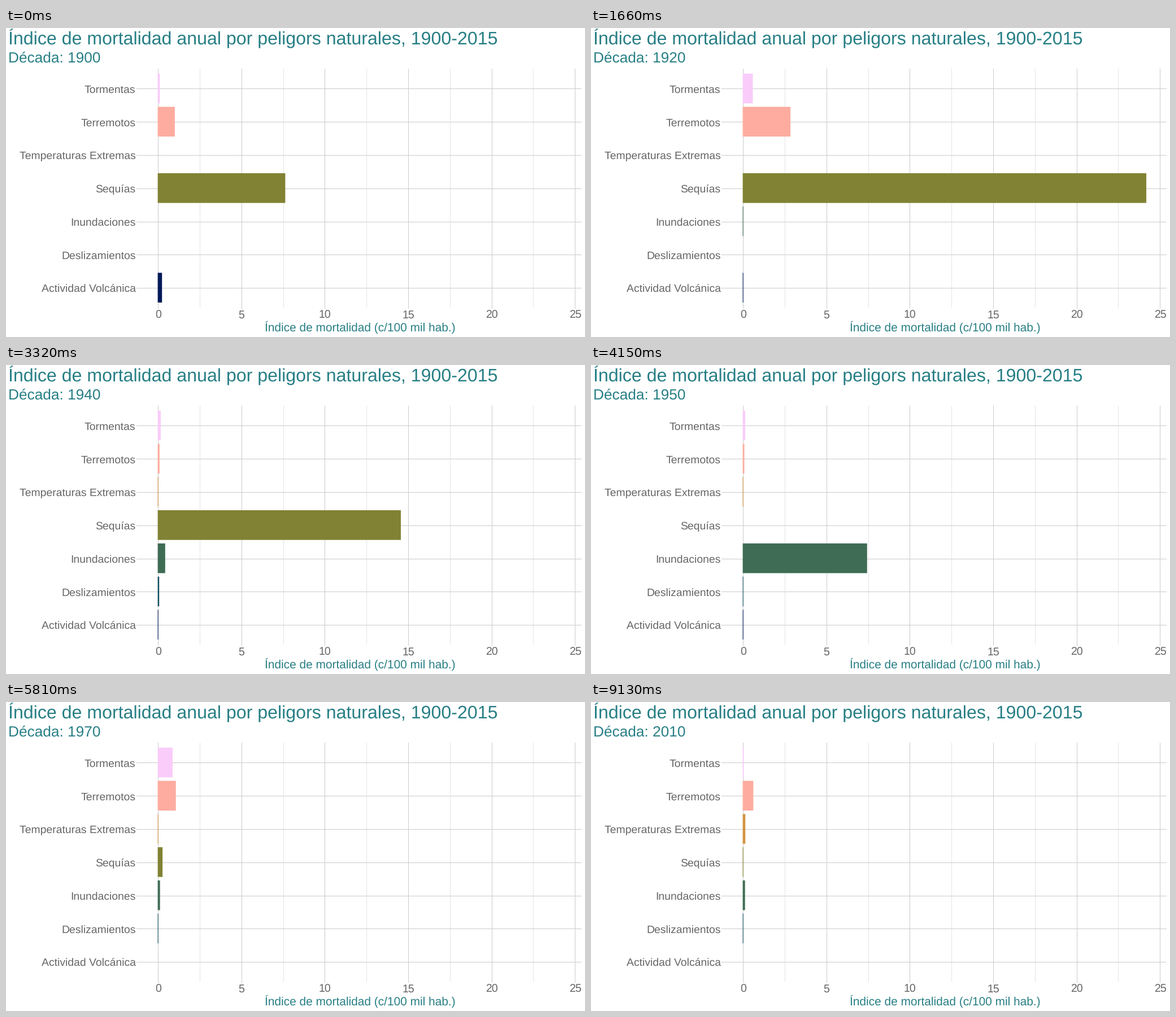
A matplotlib script that plays this animation: 1025 px wide and 547 px high, repeating every 9.96 s.

```python
import math

import matplotlib.pyplot as plt
from matplotlib.animation import FuncAnimation
from matplotlib.patches import Rectangle

W, H, DPI = 1025, 547, 64
PT = 72 / DPI                       # points per pixel
X0, UNIT = 269.1, 29.525            # zero line and pixels per unit
ROW0, PITCH = 107.49, 58.76         # first row centre and row spacing
BAR_LEFT, BAR_H = 268.6, 52.6
TOP, BOTTOM, LEFT, RIGHT = 72, 495, 231, 1019
TEAL, GREY = "#277f85", "#666666"
DECADES = range(1900, 2020, 10)


class Hazard:
    """Death rate as a steady level over some years plus bell-shaped peaks."""

    def __init__(self, name, color, level, since, until, spread, **peaks):
        self.name, self.color = name, color
        self.level, self.since, self.until = level, since, until
        self.spread = spread
        self.peaks = [(int(year[1:]), top) for year, top in peaks.items()]

    def rate(self, decade):
        steady = self.level if self.since <= decade <= self.until else 0
        bells = sum(top * math.exp(-((decade - year) / self.spread) ** 2 / 2)
                    for year, top in self.peaks)
        return max(steady, bells)


HAZARDS = [
    Hazard("Tormentas", "#f9ccf9", 0.05, 1900, 2010, 11.5,
           y1921=0.59, y1974=0.93),
    Hazard("Terremotos", "#fdac9f", 0.08, 1900, 2010, 8,
           y1900=0.84, y1919=2.83, y1970=1.07, y2005=0.75),
    Hazard("Temperaturas Extremas", "#d29343", 0.02, 1930, 2010, 5,
           y2005=0.23),
    Hazard("Sequías", "#818233", 0.02, 1990, 2010, 2,
           y1900=7.63, y1920=24.18, y1940=14.56, y1960=4.54,
           y1970=0.27, y1980=1.15),
    Hazard("Inundaciones", "#3e6c54", 0.12, 1960, 2010, 2,
           y1910=0.57, y1920=0.02, y1930=19.84, y1940=0.43, y1950=7.44),
    Hazard("Deslizamientos", "#134e60", 0.02, 1950, 2010, 2, y1940=0.07),
    Hazard("Actividad Volcánica", "#001959", 0.02, 1910, 1960, 2,
           y1900=0.24, y1980=0.05),
]

plt.rcParams["font.family"] = "Liberation Sans"
plt.rcParams["text.hinting"] = "none"

fig = plt.figure(figsize=(W / DPI, H / DPI), dpi=DPI, facecolor="white")
ax = fig.add_axes([0, 0, 1, 1])
ax.set_xlim(0, W)
ax.set_ylim(H, 0)
ax.axis("off")


def label(x, y, text, size, color, ha="left"):
    return ax.text(x, y, text, fontsize=size * PT, color=color,
                   ha=ha, va="baseline")


def rule(xs, ys, color="#cbcbcb"):
    ax.plot(xs, ys, color=color, lw=PT, snap=False,
            solid_capstyle="butt", zorder=1)


def vertical(value, bottom, **style):
    x = round(X0 + value * UNIT) + 0.5
    rule((x, x), (TOP, bottom), **style)


for k in range(5):
    vertical(2.5 + 5 * k, BOTTOM, color="#e4e4e4")
for tick in range(0, 26, 5):
    vertical(tick, BOTTOM + 2)
    label(X0 + tick * UNIT + 0.3, 514, str(tick), 19.5, GREY, "center")

bars = []
for i, hazard in enumerate(HAZARDS):
    y = ROW0 + i * PITCH
    line_y = round(y) + 0.5
    rule((LEFT, RIGHT), (line_y, line_y))
    label(229.5, y + 7.3, hazard.name, 19.4, GREY, "right")
    bar = Rectangle((BAR_LEFT, y - 0.4 - BAR_H / 2), 0, BAR_H,
                    facecolor=hazard.color, lw=0, snap=False, zorder=2)
    bars.append(ax.add_patch(bar))

label(3.5, 29.4, "Índice de mortalidad anual por peligors naturales, 1900-2015",
      32.18, TEAL)
subtitle = label(4, 60.5, "", 26.2, TEAL)
label(627, 537, "Índice de mortalidad (c/100 mil hab.)", 20.9, TEAL, "center")


def draw(i):
    decade = DECADES[i]
    subtitle.set_text(f"Década: {decade}")
    for bar, hazard in zip(bars, HAZARDS):
        rate = hazard.rate(decade)
        bar.set_width(X0 + rate * UNIT - BAR_LEFT)
        bar.set_visible(rate > 0.005)
    return [subtitle, *bars]


anim = FuncAnimation(fig, draw, frames=len(DECADES), interval=830,
                     repeat=True, repeat_delay=0, blit=False)
plt.show()
```
